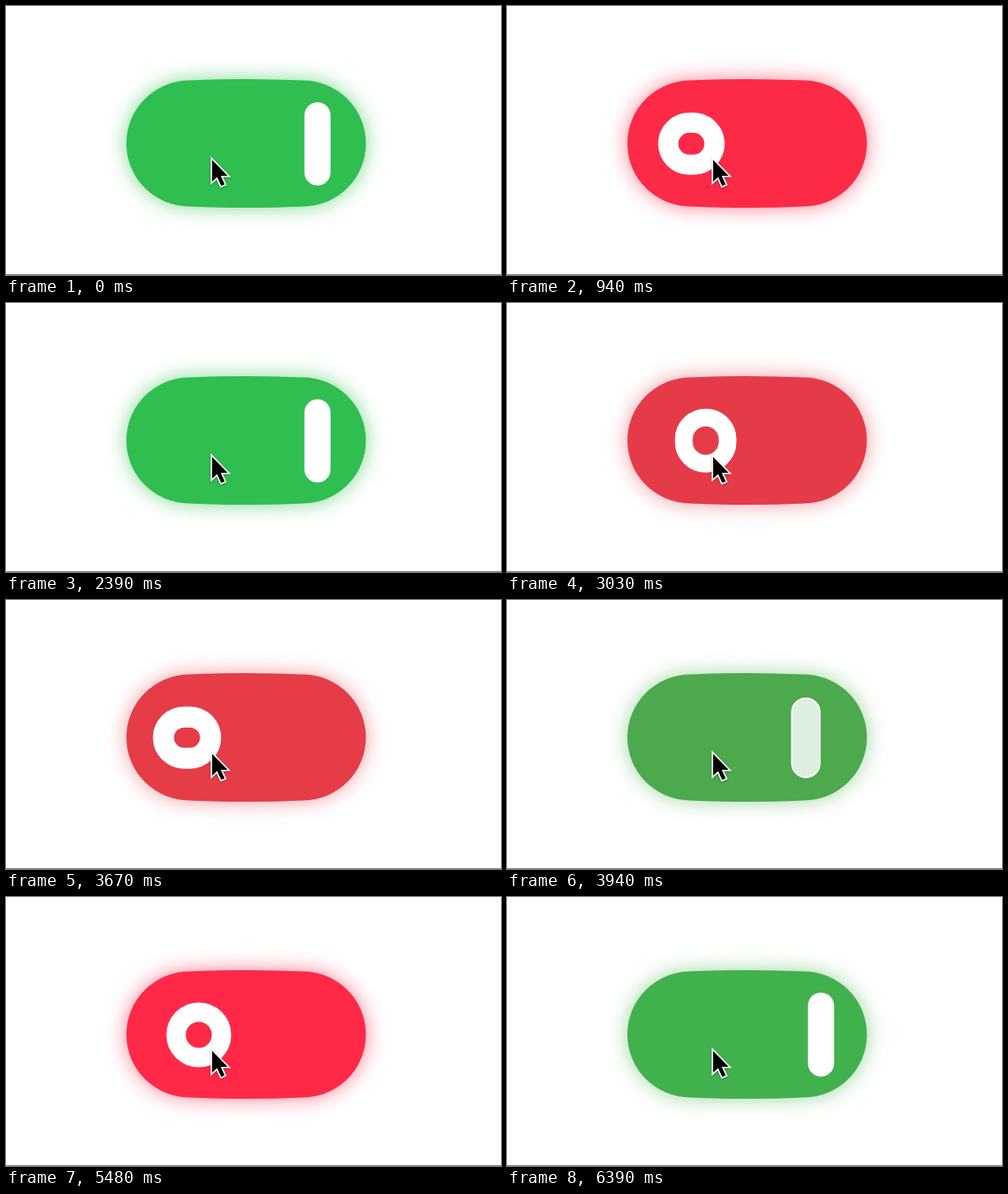
These frames come from a looping animation (588 px wide and 320 px high, 6.42 s). An HTML page:

```html
<!DOCTYPE html>
<html lang="en">
<head>
<meta charset="utf-8">
<title>Toggle</title>
<style>
  html, body { margin: 0; width: 100%; height: 100%; overflow: hidden; background: #fff; }
  .stage { position: relative; width: 588px; height: 320px; overflow: hidden; }
  svg { position: absolute; inset: 0; }
  .glow { filter: blur(12px); }
  .knob {
    --p: 1;
    position: absolute;
    left: calc(228.5px + 141px * var(--p));
    top: 163.5px;
    width: 31px;
    height: calc(31px + 68px * var(--p));
    border: solid #fff;
    border-width: max(0px, 23px * (1 - var(--p)));
    border-radius: 100px;
    transform: translate(-50%, -50%);
  }
  .line { position: absolute; left: 0; top: 319px; width: 100%; height: 1px; background: #777; }
  .cursor {
    fill: #000; stroke: #fff; stroke-width: 3.4; paint-order: stroke;
    filter: drop-shadow(0 1px 1px rgb(0 0 0 / .3));
  }
</style>
</head>
<body>
<div class="stage">
  <svg width="588" height="320">
    <defs>
      <path id="pill" d="M218 88.5Q285.3 85.5 352.5 88.5A75 75 0 0 1 352.5 238.5Q285.3 241.5 218 238.5A75 75 0 0 1 218 88.5Z"/>
    </defs>
    <use class="glow" href="#pill"/>
    <use class="body" href="#pill"/>
  </svg>
  <div class="knob"></div>
  <svg width="588" height="320">
    <path class="cursor" d="M244.8 183v26l6-5.6 4.8 10.6 4.2-1.8-4.7-10.3h8.1z"/>
  </svg>
  <div class="line"></div>
</div>
<script>
  const LOOP = 6420, DURATION = 700;
  const CLICKS = [320, 1428, 2610, 3534, 4500, 5935];
  const RED = [255, 41, 71], GREEN = [47, 190, 79];

  const glow = document.querySelector('.glow');
  const body = document.querySelector('.body');
  const knob = document.querySelector('.knob');

  const clamp = v => Math.min(1, Math.max(0, v));

  function bezier(x1, y1, x2, y2) {
    const at = (a, b, s) => 3 * (1 - s) ** 2 * s * a + 3 * (1 - s) * s * s * b + s ** 3;
    return x => {
      if (x <= 0 || x >= 1) return clamp(x);
      let lo = 0, hi = 1;
      for (let i = 0; i < 24; i++) {
        const mid = (lo + hi) / 2;
        if (at(x1, x2, mid) < x) lo = mid; else hi = mid;
      }
      return at(y1, y2, lo);
    };
  }

  const moveEase = bezier(.68, -.55, .27, 1.55);
  const colorEase = bezier(.4, 0, .2, 1);

  function draw(now) {
    const time = now % LOOP;
    const clicks = CLICKS.filter(c => c <= time);
    const on = clicks.length % 2 === 0;
    const t = clicks.length ? clamp((time - clicks.at(-1)) / DURATION) : 1;
    const toward = v => on ? v : 1 - v;
    const p = toward(moveEase(t)), c = toward(colorEase(t));
    const color = `rgb(${RED.map((r, i) => Math.round(r + (GREEN[i] - r) * c))})`;

    body.style.fill = glow.style.fill = color;
    glow.style.opacity = .6 - .8 * c * (1 - c);
    knob.style.setProperty('--p', p.toFixed(4));
    knob.style.backgroundColor = `rgba(255, 255, 255, ${clamp(p) ** 2})`;
  }

  const start = performance.now();
  function tick() {
    draw(performance.now() - start);
    requestAnimationFrame(tick);
  }
  tick();
</script>
</body>
</html>
```
